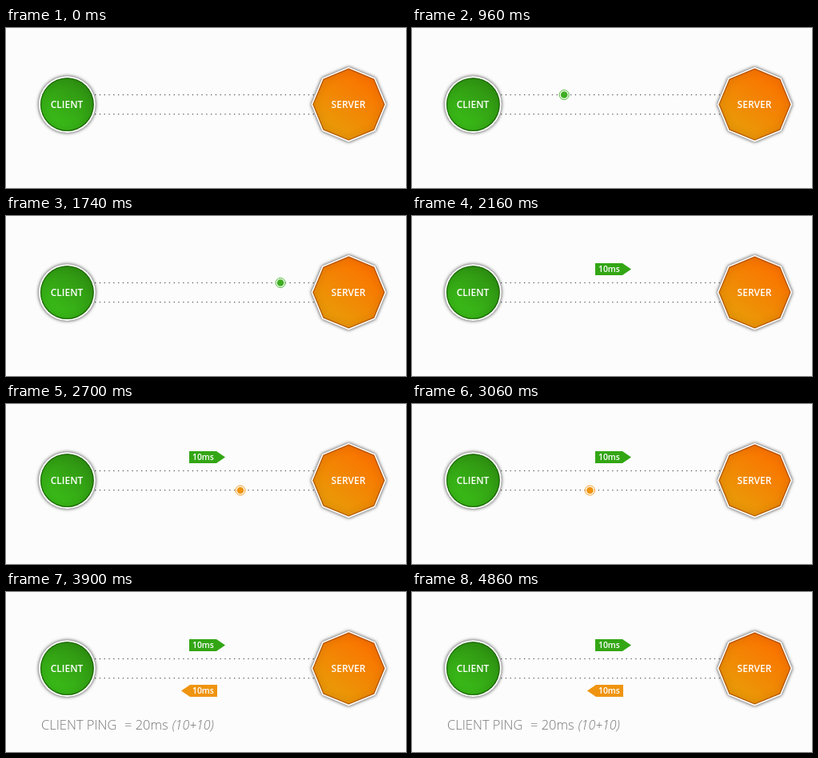
These frames come from a looping animation (500 by 200 pixels, 5.1 s). An HTML page with a canvas:

```html
<!DOCTYPE html>
<html lang="en">
<head>
<meta charset="utf-8">
<title>Client ping</title>
<style>
  html, body { margin: 0; width: 100%; height: 100%; overflow: hidden; background: #fcfcfc; }
  canvas { display: block; width: 500px; height: 200px; }
</style>
</head>
<body>
<canvas id="stage"></canvas>
<script>
const LOOP = 5100, STEP = 60, SPEED = 0.196;
const GREEN = '#33a614', ORANGE = '#ef9410';
const FONT = '"Open Sans", "Noto Sans", sans-serif';

const canvas = document.getElementById('stage');
const ratio = window.devicePixelRatio || 1;
canvas.width = 500 * ratio;
canvas.height = 200 * ratio;
const ctx = canvas.getContext('2d');
ctx.scale(ratio, ratio);

function circle(x, y, r) {
  const path = new Path2D();
  path.arc(x, y, r, 0, Math.PI * 2);
  return path;
}

function polygon(points) {
  const path = new Path2D();
  points.forEach(([x, y]) => path.lineTo(x, y));
  path.closePath();
  return path;
}

function octagon(x, y, r) {
  return polygon(Array.from({ length: 8 }, (_, i) => {
    const a = i * Math.PI / 4;
    return [x + r * Math.cos(a), y + r * Math.sin(a)];
  }));
}

function fill(path, color) {
  ctx.fillStyle = color;
  ctx.fill(path);
}

function text(str, x, y, style, color, align = 'left') {
  ctx.font = `${style} ${FONT}`;
  ctx.fillStyle = color;
  ctx.textAlign = align;
  ctx.fillText(str, x, y);
}

function dottedLine(y) {
  ctx.fillStyle = '#555';
  for (let x = 111; x < 384; x += 5.8) ctx.fillRect(x, y - 0.6, 1.3, 1.2);
}

function node(shape, x, y, r, rim, colors, edge, label) {
  ctx.save();
  ctx.shadowColor = 'rgba(0,0,0,.8)';
  ctx.shadowBlur = 4 * ratio;
  fill(shape(x, y, r + rim), '#fff');
  ctx.restore();

  const d = r * 0.7;
  const shade = ctx.createLinearGradient(x + d * 0.7, y - d, x - d * 0.7, y + d);
  colors.forEach((c, i) => shade.addColorStop(i, c));
  const face = shape(x, y, r);
  fill(face, shade);

  // Soft dark edge inside the face.
  ctx.save();
  ctx.clip(face);
  ctx.shadowColor = edge;
  ctx.shadowBlur = 10 * ratio;
  ctx.strokeStyle = edge;
  ctx.lineWidth = 2.5;
  ctx.stroke(face);
  ctx.restore();

  text(label, x - 0.4, y + 4.4, '600 12px', '#fff', 'center');
}

function packet(x, y, color) {
  ctx.strokeStyle = color;
  ctx.lineWidth = 0.9;
  const ring = circle(x, y, 6);
  fill(ring, '#fff');
  ctx.stroke(ring);
  fill(circle(x, y, 4.3), color);
}

function tag(points, color, baseline) {
  fill(polygon(points), color);
  text('10ms', 233, baseline, '600 10.4px', '#fff');
}

function draw(t) {
  ctx.fillStyle = '#fcfcfc';
  ctx.fillRect(0, 0, 500, 200);
  dottedLine(83.5);
  dottedLine(107.7);

  if (t >= 480 && t < 2040) packet(190.2 + (t - 960) * SPEED, 83.5, '#3eae22');
  if (t >= 2160 && t < 3720) packet(293 - (t - 2700) * SPEED, 108, ORANGE);

  node(circle, 76.4, 95.6, 33.4, 2, ['#309512', '#3abb18'], 'rgba(20,80,0,.7)', 'CLIENT');
  node(octagon, 428.4, 95.6, 45, 1.8, ['#fa7400', '#ea9a08'], 'rgba(160,70,0,.7)', 'SERVER');

  if (t >= 2040) {
    tag([[229, 59], [263, 59], [274, 66.5], [263, 74], [229, 74]], GREEN, 69.7);
  }
  if (t >= 3720) {
    tag([[264, 116], [230, 116], [219, 123.5], [230, 131], [264, 131]], ORANGE, 127.2);
    text('CLIENT PING', 44, 172, '300 16.5px', '#777');
    text('= 20ms', 148, 172, '300 16.5px', '#777');
    text('(10+10)', 207.5, 172, 'italic 300 16px', '#777');
  }
}

const start = performance.now();
function frame() {
  const t = (performance.now() - start) % LOOP;
  draw(Math.floor(t / STEP) * STEP);
  requestAnimationFrame(frame);
}
frame();
</script>
</body>
</html>
```
